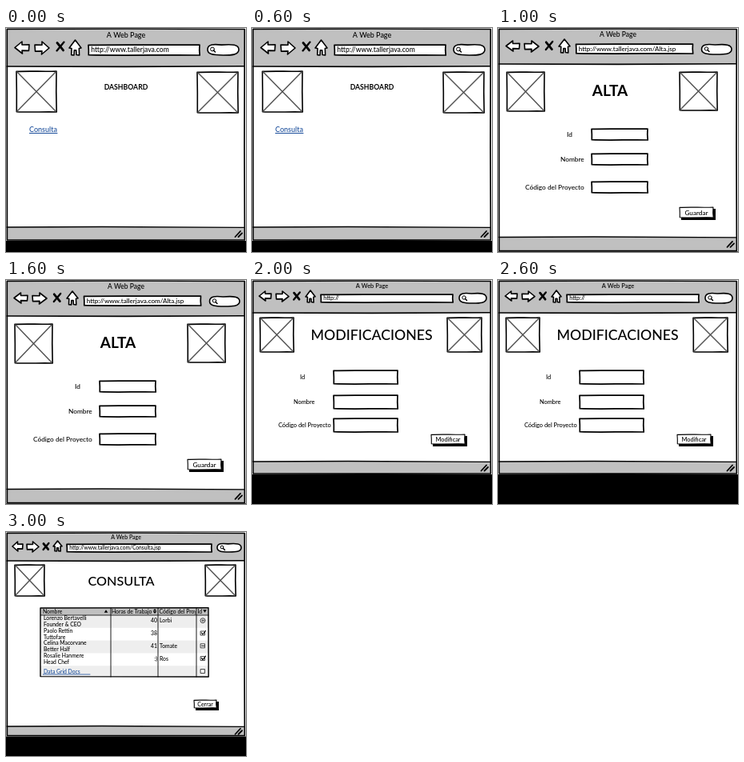
These frames come from a looping animation (300 px wide and 280 px high, 4000 ms). An HTML page with a canvas:

```html
<!DOCTYPE html>
<html lang="es">
<head>
<meta charset="utf-8">
<title>Mockup</title>
<style>
html, body { margin: 0; width: 100%; height: 100%; overflow: hidden; background: #000; }
canvas { display: block; }
</style>
</head>
<body>
<canvas id="stage" width="300" height="280"></canvas>
<script>
const ctx = document.getElementById('stage').getContext('2d');
const GRAY = '#c0c0c0', INK = '#000', LINK = '#1c4f9c';
const FACE = 'Lato, "Open Sans", sans-serif';

function path(pts, { fill, line = 1.5, color = INK, open } = {}) {
  ctx.beginPath();
  pts.forEach(([x, y]) => ctx.lineTo(x, y));
  if (!open) ctx.closePath();
  if (fill) { ctx.fillStyle = fill; ctx.fill(); }
  if (line) { ctx.lineWidth = line; ctx.strokeStyle = color; ctx.stroke(); }
}

const stroke = (pts, line, color) => path(pts, { line, color, open: true });

function text(str, x, y, size, { align = 'left', weight = 500, color = INK } = {}) {
  ctx.font = `${weight} ${size}px ${FACE}`;
  ctx.textAlign = align;
  ctx.fillStyle = color;
  ctx.fillText(str, x, y);
}

// Box with slightly bowed, hand-drawn edges
function sketchBox(l, t, r, b, fill = '#fff', line = 1.7) {
  const w = r - l;
  ctx.beginPath();
  ctx.moveTo(l, t + 0.4);
  ctx.bezierCurveTo(l + w * 0.3, t - 0.4, l + w * 0.7, t + 0.6, r, t);
  ctx.quadraticCurveTo(r - 0.6, (t + b) / 2, r + 0.2, b);
  ctx.bezierCurveTo(l + w * 0.7, b - 0.5, l + w * 0.3, b + 0.6, l + 0.3, b - 0.3);
  ctx.quadraticCurveTo(l + 0.5, (t + b) / 2, l, t + 0.4);
  ctx.fillStyle = fill;
  ctx.fill();
  ctx.lineWidth = line;
  ctx.strokeStyle = INK;
  ctx.stroke();
}

function icon(shape, [l, t, r, b], flip) {
  const w = r - l, h = b - t;
  path(shape.map(([u, v]) => [flip ? r - u * w : l + u * w, t + v * h]), { fill: '#fff', line: 1.6 });
}

const ARROW = [[0, .5], [.5, 0], [.5, .27], [1, .25], [.97, .76], [.5, .74], [.53, 1]];
const HOUSE = [[.5, 0], [1, .52], [.82, .55], [.84, 1], [.6, .97], [.58, .68],
               [.42, .68], [.4, 1], [.18, .98], [.2, .55], [0, .53]];

function cross(x, y, s) {
  stroke([[x - s * .9, y - s], [x + s * .8, y + s * 1.1]], 2.8);
  stroke([[x + s, y - s * 1.2], [x - s, y + s * 1.2]], 2.3);
}

function search(l, t, r, b) {
  const w = r - l, h = b - t, y = (t + b) / 2;
  ctx.beginPath();
  ctx.moveTo(l, y);
  ctx.bezierCurveTo(l, t, l + w * .2, t, l + w * .45, t + h * .08);
  ctx.bezierCurveTo(l + w * .8, t, r, t + h * .05, r, y);
  ctx.bezierCurveTo(r, b, l + w * .75, b, l + w * .5, b);
  ctx.bezierCurveTo(l + w * .15, b, l, b - h * .1, l, y);
  ctx.fillStyle = '#fff';
  ctx.fill();
  ctx.lineWidth = 1.6;
  ctx.strokeStyle = INK;
  ctx.stroke();
  ctx.beginPath();
  ctx.arc(l + 6, y - .5, h * .17, 0, 7);
  ctx.lineWidth = 1;
  ctx.stroke();
  stroke([[l + 7.5, y + 1], [l + 9.5, y + 3]], 1.5);
}

function picture(l, t, r, b) {
  sketchBox(l, t, r, b, '#fff', 1.6);
  stroke([[l + 1, t + 1], [r - 1, b - 1]], 1.5, '#555');
  stroke([[r - 1, t + 1], [l + 1, b - 1]], 1.5, '#555');
}

function button(label, l, t, r, b, size) {
  ctx.fillStyle = INK;
  ctx.fillRect(l + 2, t + 2, r - l + 1, b - t + 1);
  sketchBox(l, t, r, b, '#fff', 1.1);
  text(label, (l + r) / 2, (t + b) / 2 + size * .4, size, { align: 'center' });
}

function browser({ head, foot, bottom, size, back, next, x, house, url, find, address }) {
  ctx.fillStyle = '#fff';
  ctx.fillRect(0, 0, 300, bottom + 1);
  ctx.fillStyle = GRAY;
  ctx.fillRect(1.5, 1.5, 296.5, head - 1.5);
  ctx.fillRect(1.5, foot, 296.5, bottom - foot);
  path([[1.3, 1.4], [150, 1], [298.3, 1.5], [298, 150], [298.4, bottom], [150, bottom + .2], [1.4, bottom]],
    { line: 1.7 });
  stroke([[1, head], [150, head + .4], [298, head - .2]], 1.6);
  stroke([[1, foot], [120, foot - .5], [298, foot + .3]], 1.3);
  text('A Web Page', 150, size * 1.35 - .3, size, { align: 'center' });
  icon(ARROW, back);
  icon(ARROW, next, true);
  cross(...x);
  icon(HOUSE, house);
  sketchBox(...url);
  text(address, url[0] + 3.3, (url[1] + url[3]) / 2 + size * .33, size * .95);
  search(...find);
  const y = (foot + bottom) / 2;
  stroke([[286.5, y + 4], [293, y - 3]], 1.8);
  stroke([[290.5, y + 4], [295, y - .5]], 1.8);
}

function dashboard() {
  browser({
    head: 48, foot: 249, bottom: 265, size: 9,
    back: [11, 17, 29, 32], next: [36, 17, 54, 33], x: [68, 23, 4.5], house: [79, 15, 94, 34],
    url: [103, 21, 242, 34], find: [252, 20, 291, 34], address: 'http://www.tallerjava.com'
  });
  picture(13, 54, 63, 105);
  picture(239, 55, 290, 106);
  text('DASHBOARD', 150, 77, 8.7, { align: 'center', weight: 700 });
  text('Consulta', 29, 130, 9, { color: LINK });
  stroke([[29, 131.5], [64, 131.5]], 1, LINK);
}

function form(size, left, right, rows, labels) {
  rows.forEach(([t, b], i) => {
    sketchBox(left, t, right, b);
    const [label, x] = labels[i];
    text(label, x, (t + b) / 2 + size * .33, size);
  });
}

function create() {
  browser({
    head: 45, foot: 261.5, bottom: 278.3, size: 8.5,
    back: [10, 16, 27, 29], next: [33, 16, 51, 30], x: [64, 22, 4.2], house: [76, 14, 90, 31],
    url: [97.5, 20, 243.5, 32], find: [254.5, 20, 292, 33], address: 'http://www.tallerjava.com/Alta.jsp'
  });
  picture(11, 55, 58, 104);
  picture(227, 55, 274, 103);
  text('ALTA', 140, 84.5, 19, { align: 'center', weight: 700 });
  form(8.3, 117, 187, [[126, 140], [157, 171], [192, 206]],
    [['Id', 86], ['Nombre', 78], ['Código del Proyecto', 34]]);
  button('Guardar', 227, 224, 269, 237, 8.2);
}

function edit() {
  browser({
    head: 41, foot: 227, bottom: 242, size: 7.5,
    back: [9, 14, 24, 26], next: [30, 14, 46, 27], x: [56, 20, 3.8], house: [67, 13, 79, 28],
    url: [86, 18, 251, 28], find: [259, 16, 293, 29], address: 'http://'
  });
  picture(10, 47, 52, 90);
  picture(244, 47, 287, 90);
  text('MODIFICACIONES', 149.6, 74.5, 17.7, { align: 'center' });
  form(7.4, 102, 182, [[113, 130], [144, 161], [173, 190]],
    [['Id', 60], ['Nombre', 52], ['Código del Proyecto', 33]]);
  button('Modificar', 224, 193, 266, 205, 7.4);
}

function triangle(x, y, s) {
  path([[x - 2.3, y + s], [x + 2.3, y + s], [x, y - s]], { fill: INK, line: 0 });
}

function marker(kind, x, y) {
  ctx.lineWidth = .9;
  ctx.strokeStyle = '#333';
  if (kind === 'radio') {
    for (const r of [3, 1]) {
      ctx.beginPath();
      ctx.arc(x, y, r, 0, 7);
      ctx.stroke();
    }
    return;
  }
  ctx.fillStyle = '#fff';
  ctx.fillRect(x - 2.5, y - 2.5, 5, 5);
  ctx.strokeRect(x - 2.5, y - 2.5, 5, 5);
  if (kind === 'check') stroke([[x - 1.5, y - .5], [x, y + 1.5], [x + 3.5, y - 3]], 1.1);
  if (kind === 'mixed') stroke([[x - 1.5, y], [x + 1.5, y]], 1);
}

const people = [
  ['Lorenzo Bertavelli', 'Founder & CEO', '40', 'Lorbi', 'radio'],
  ['Paolo Rettin', 'Tuttofare', '38', '', 'check'],
  ['Celina Macorvane', 'Better Half', '41', 'Tomate', 'mixed'],
  ['Rosalie Hanmere', 'Head Chef', ':)', 'Ros', 'check']
];

function grid() {
  const size = 6.8, rowH = 15.8;
  ctx.fillStyle = '#fff';
  ctx.fillRect(43, 95, 210, 86);
  ctx.fillStyle = GRAY;
  ctx.fillRect(43, 95, 210, 9);
  ctx.fillStyle = '#eee';
  for (const i of [0, 2, 4]) ctx.fillRect(43, 104 + i * rowH, 210, i === 4 ? 13.8 : rowH);
  for (const x of [131, 190, 238]) stroke([[x, 95], [x, 181]], .9);
  stroke([[43, 104], [253, 104]], .8);

  text('Nombre', 46, 101.8, size);
  ctx.save();
  ctx.beginPath();
  ctx.rect(131, 95, 106, 9);
  ctx.clip();
  text('Horas de Trabajo', 132, 101.8, size);
  text('Código del Proyecto', 191.5, 101.8, size);
  ctx.restore();
  text('Id', 239.5, 101.8, size);
  triangle(125, 99, 1.8);
  triangle(186, 97.2, 1.3);
  triangle(186, 100.6, -1.3);
  triangle(248.5, 99, -1.8);

  people.forEach(([name, job, hours, nick, mark], i) => {
    const y = 109.7 + i * rowH;
    text(name, 47, y, size);
    text(job, 47, y + 8, size);
    text(hours, 189, y + 3.5, size, { align: 'right' });
    text(nick, 192, y + 3.5, size);
    marker(mark, 246, y + 1);
  });
  text('Data Grid Docs', 47, 176.5, size, { color: LINK });
  stroke([[46, 178], [105, 178]], .8, LINK);
  marker('empty', 246, 174);
  path([[43, 95], [253, 94.6], [253.2, 181], [43, 180.6]], { line: 1.4 });
}

function list() {
  browser({
    head: 36, foot: 243, bottom: 254.5, size: 7,
    back: [8, 12, 21, 24], next: [26, 12, 41, 25], x: [50, 18, 3.4], house: [59, 11, 70, 24],
    url: [76, 15, 257, 25], find: [264, 14, 294, 25], address: 'http://www.tallerjava.com/Consulta.jsp'
  });
  picture(11, 41, 48, 80);
  picture(249, 41, 287, 80);
  text('CONSULTA', 144, 66.5, 16.2, { align: 'center' });
  grid();
  button('Cerrar', 235, 210, 263, 220, 7);
}

const screens = [dashboard, create, edit, list];
const start = performance.now();

function draw() {
  const t = (performance.now() - start) % 4000;
  ctx.fillStyle = INK;
  ctx.fillRect(0, 0, 300, 280);
  ctx.lineJoin = ctx.lineCap = 'round';
  screens[Math.floor(t / 1000)]();
  requestAnimationFrame(draw);
}
draw();
</script>
</body>
</html>
```
